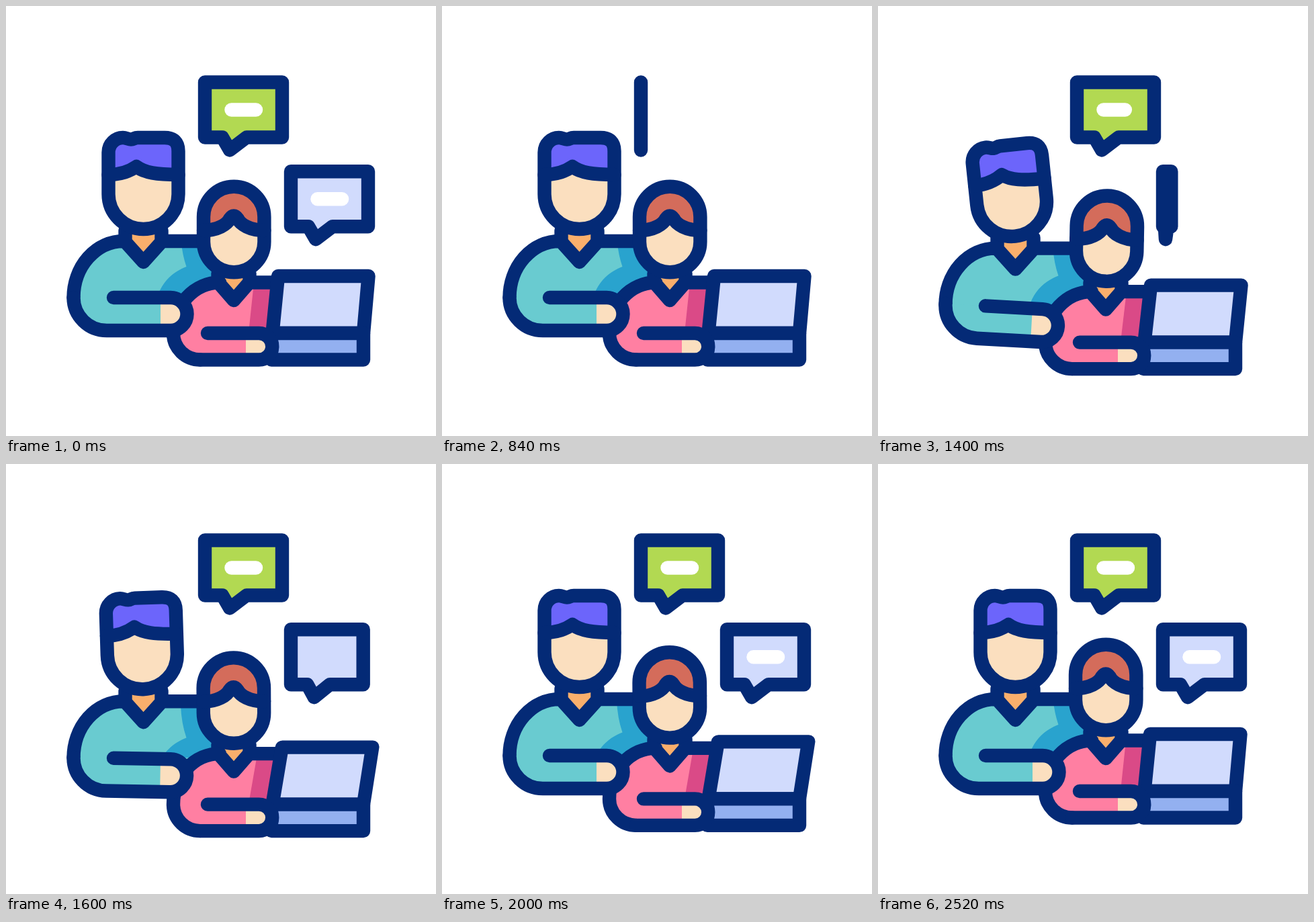
Animation, 640 px wide and 640 px high, one loop 2560 ms. Source, as an HTML page:

```html
<!DOCTYPE html>
<html lang="en">
<head>
<meta charset="utf-8">
<title>Two people chatting at a laptop</title>
<style>
  html, body { margin: 0; height: 100%; overflow: hidden; background: #fff; }
  svg { display: block; width: 100%; height: 100%; }
  .line { fill: none; stroke: #042a76; stroke-width: 20.4; stroke-linecap: round; stroke-linejoin: round; }
  .pill { fill: none; stroke: #fff; stroke-width: 20.4; stroke-linecap: round; }
  .skin { fill: #fbdfbf; }
  .neck { fill: #faaf6c; }
  .teal { fill: #69cbd0; }
  .blue { fill: #29a3ce; }
  .pink { fill: #ff7fa2; }
  .rose { fill: #da4a87; }
  .screen { fill: #d1dbfd; }
  .base { fill: #93b0f0; }
  .lime { fill: #b2d952; }
</style>
</head>
<body>
<svg viewBox="0 0 640 640">
  <defs>
    <clipPath id="torsoClip"><path d="M175 350A74.5 84 0 0 0 100.5 434H306V350Z"/></clipPath>
    <path id="manSkull" d="M152.5 218C152.5 205 163 196 174 196C179 196 182 198.5 186 198.5C190 198.5 191 196 196 196H236Q256.5 196 256.5 216V280A52 52 0 0 1 152.5 280Z"/>
    <path id="womanSkull" d="M294 314A45.2 45.2 0 0 1 384.4 314V351A45.2 45.2 0 0 1 294 351Z"/>
    <path id="lidShape" d="M396.5 487L405 402H539.5L532 487Z"/>
  </defs>

  <g id="man">
    <path class="teal" d="M175 350A74.5 84 0 0 0 100.5 434V442H306V350Z"/>
    <g clip-path="url(#torsoClip)">
      <path id="shade" class="blue" d="M260 310V340Q261 366 268.5 388C250 395 235 408 227 428L320 440V310Z"/>
    </g>
    <path class="neck" d="M177.5 332V351L204.5 381L231.5 351V332Z"/>
    <path class="line" d="M175 350A74.5 84 0 0 0 100.5 434M231.5 350H296M177.5 334V351L204.5 381L231.5 351V334"/>
    <g id="manHead">
      <use href="#manSkull" class="skin"/>
      <path fill="#6c65fb" d="M152.5 251V218C152.5 205 163 196 174 196C179 196 182 198.5 186 198.5C190 198.5 191 196 196 196H236Q256.5 196 256.5 216V251C224 251 206 248 194 239C184 246 172 251 152.5 251Z"/>
      <use href="#manSkull" class="line"/>
      <path class="line" d="M152.5 251C172 251 184 246 194 239C206 248 224 251 256.5 251"/>
    </g>
  </g>

  <g class="woman">
    <path class="pink" d="M318 411.5A69 75.5 0 0 0 249 487A40 39.5 0 0 0 289 526.5H396V487L410 411.5Z"/>
    <path class="rose lid" d="M369 411.5L361 487H398L406 411.5Z"/>
    <path class="neck" d="M315.5 396V411L339 438L362.5 411V396Z"/>
    <path class="line" d="M318 411.5A69 75.5 0 0 0 249 487A40 39.5 0 0 0 289 526.5M362.5 411.5H405M315.5 398V411L339 438L362.5 411V398"/>
    <g id="womanHead">
      <use href="#womanSkull" class="skin"/>
      <path fill="#d46c5b" d="M294 334V314A45.2 45.2 0 0 1 384.4 314V334C363 334 349 325 345 317Q339 308 333 317C329 325 315 334 294 334Z"/>
      <use href="#womanSkull" class="line"/>
      <path class="line" d="M294 334C315 334 329 325 333 317Q339 308 345 317C349 325 363 334 384.4 334"/>
    </g>
    <g class="lid">
      <use href="#lidShape" class="screen"/>
      <use href="#lidShape" class="line"/>
    </g>
    <path class="base" d="M395 487H532V526.5H395Z"/>
    <path class="line" d="M395 487H532V526.5H395Z"/>
    <path class="skin" d="M357 487H376.5A19.75 19.75 0 0 1 376.5 526.5H357Z"/>
    <path class="line" d="M300 487H376.5A19.75 19.75 0 0 1 376.5 526.5H289"/>
  </g>

  <g id="manArm">
    <path class="teal" d="M100.5 434A49.5 49 0 0 0 150 483H232V434Z"/>
    <path class="skin" d="M230 434H245A24.5 24.5 0 0 1 245 483H230Z"/>
    <path class="line" d="M160 434H245A24.5 24.5 0 0 1 245 483H150A49.5 49 0 0 1 100.5 434"/>
  </g>

  <g id="reply"><path class="screen line-box"/><path class="line"/><path class="pill"/></g>
  <g id="hello"><path class="lime line-box"/><path class="line"/><path class="pill"/></g>
</svg>

<script>
const LOOP = 2560, STEP = 40;
const $ = q => document.querySelector(q);
const $$ = q => document.querySelectorAll(q);
const move = (el, value) => el.setAttribute('transform', value);

const clamp = x => Math.min(1, Math.max(0, x));
const ease = x => (1 - Math.cos(Math.PI * clamp(x))) / 2;
const span = (t, from, to) => clamp((t - from) / (to - from));

// Eased value along a list of [time, value] points
function track(t, points) {
  let value = points[0][1];
  for (let i = 1; i < points.length; i++) {
    const [t0, v0] = points[i - 1], [t1, v1] = points[i];
    if (t >= t0) value = v0 + (v1 - v0) * ease((t - t0) / (t1 - t0));
  }
  return value;
}

const bubbles = [
  { el: $('#hello'), x: 296, y: 113.5, leave: [60, 510], grow: 836, write: 1150 },
  { el: $('#reply'), x: 424, y: 246.2, leave: [240, 602], grow: 1332, write: 1662 }
];
const GROW = 320;
// Corners of the speech bubble, relative to its top left
const corners = [[0, 0], [115, 0], [115, 82], [62, 82], [37, 101], [26, 82], [0, 82]];

function drawBubble({ el, x, y, leave, grow, write }, t) {
  const [shape, outline, pill] = el.children;
  const back = t >= grow;
  const gone = span(t, ...leave);
  const width = back ? ease((t - grow) / GROW) : 1;
  const dash = back ? ease((t - write) / GROW) : 1;
  const d = 'M' + corners.map(([cx, cy]) => `${x + cx * width} ${y + cy}`).join('L') + 'Z';
  shape.setAttribute('d', d);
  outline.setAttribute('d', d);
  pill.setAttribute('d', `M${x + 39.5} ${y + 41}h${36.5 * dash + 0.01}`);
  pill.style.display = back && t < write ? 'none' : '';
  el.style.opacity = back ? 1 : 1 - gone;
  move(el, `translate(0 ${back ? 0 : -60 * (1 - (1 - gone) ** 1.4)})`);
}

function draw(t) {
  const lean = track(t, [[860, 0], [1300, 1], [1760, 0]]);
  const manY = 12 * lean;
  const womanY = track(t, [[980, 0], [1660, 20], [1700, 20], [2360, 0]]);
  const nod = track(t, [[1000, 0], [1340, 1.2], [1740, -0.8], [2200, 0]]);
  const tilt = track(t, [[1280, 0], [1820, 9], [2260, 0]]) / 85;

  move($('#man'), `translate(0 ${manY})`);
  move($('#manHead'), `rotate(${-6.75 * lean} 204.5 333)`);
  move($('#manArm'), `translate(0 ${manY}) rotate(${3.6 * lean} 130 434)`);
  move($('#shade'), `translate(0 ${womanY - manY})`);
  move($('.woman'), `translate(0 ${womanY})`);
  move($('#womanHead'), `rotate(${nod} 339 400)`);
  // Shear around the hinge at y = 487
  $$('.lid').forEach(el => move(el, `matrix(1 0 ${-tilt} 1 ${487 * tilt} 0)`));
  bubbles.forEach(b => drawBubble(b, t));
}

let start;
function tick(now) {
  start ??= now;
  const t = (now - start) % LOOP;
  draw(Math.floor(t / STEP) * STEP);
  requestAnimationFrame(tick);
}
draw(0);
requestAnimationFrame(tick);
</script>
</body>
</html>
```
